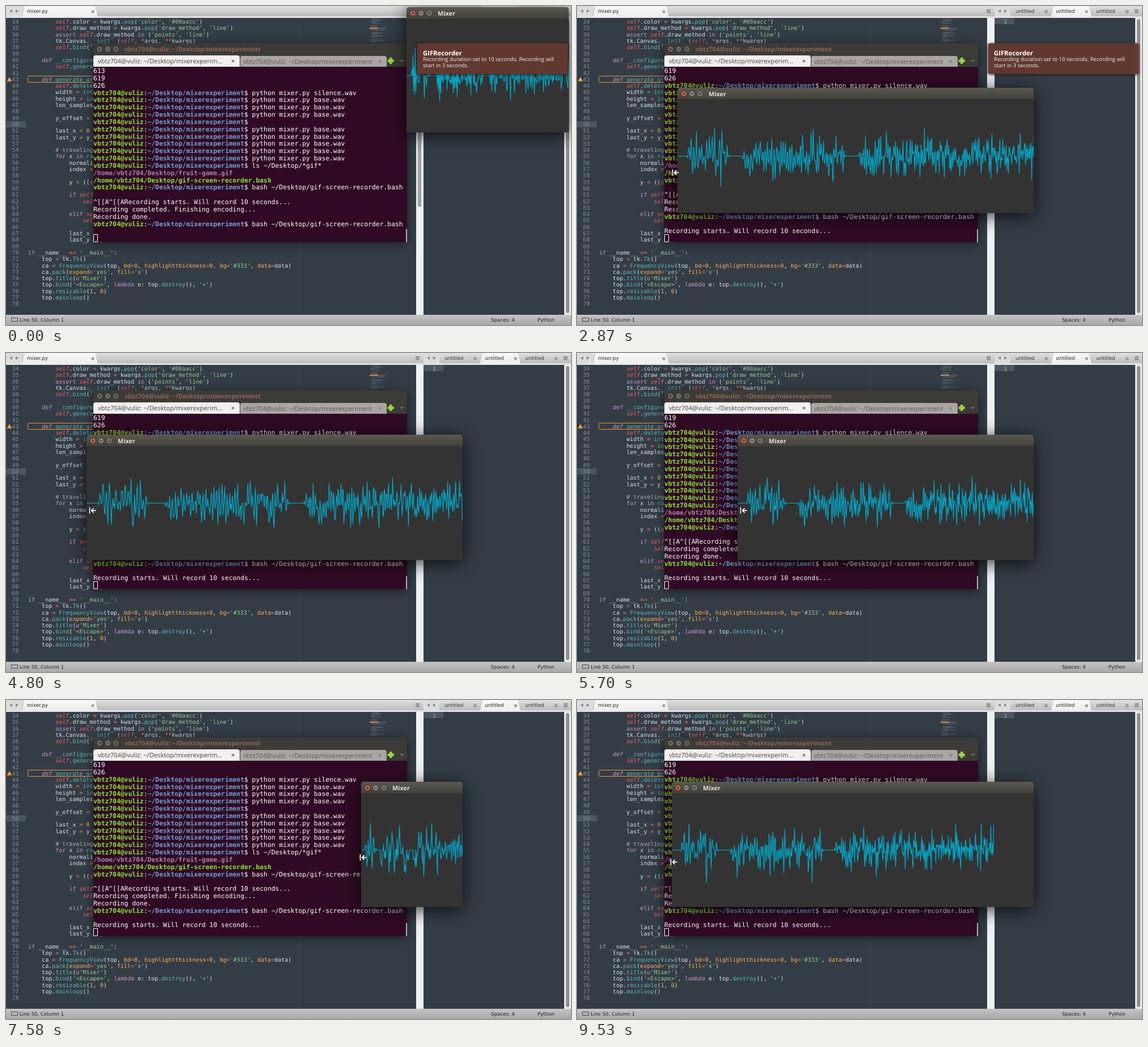
Write an HTML page with a canvas that moves like this. It is 996 px wide and 562 px high and loops after 9.61 s.

```html
<!DOCTYPE html>
<html lang="en">
<head>
<meta charset="utf-8">
<title>Mixer</title>
<style>
html, body { margin: 0; width: 100%; height: 100%; overflow: hidden; background: #343d46; }
canvas { display: block; width: 996px; height: 562px; }
</style>
</head>
<body>
<canvas id="stage" width="996" height="562"></canvas>
<script>
const ctx = document.getElementById('stage').getContext('2d');
ctx.textRendering = 'geometricPrecision';
ctx.lineJoin = 'bevel';

const LOOP = 9610, HOLD = 70;
const DROP = 560, RESIZE = 1260, FADE = 3330, PLOT_LAG = 200;
const MONO = '"DejaVu Sans Mono", monospace';
const SANS = '"DejaVu Sans", sans-serif';
const UI = '"Open Sans", sans-serif';
const USER = 'vbtz704', HOST = 'vuliz';
const PATH = '~/Desktop/mixerexperiment';

// ---- motion
const clamp = v => Math.max(0, Math.min(1, v));
const mix = (a, b, k) => a + (b - a) * k;
const ease = k => k * k * (3 - 2 * k);
const bell = (x, mid, w) => Math.exp(-(((x - mid) / w) ** 2));

// turning points of the dragged left edge: time, x
const EDGE = [
  [1940, 519], [2220, 303], [2660, 177], [2870, 177], [3140, 133], [3900, 48], [4600, 48],
  [4760, 142], [5260, 224], [5500, 225], [5670, 283], [6340, 406], [7350, 626], [7600, 626],
  [7940, 619], [8650, 340], [9070, 325], [9320, 238], [9520, 167]
];

function edgeAt(t) {
  const i = EDGE.findIndex(p => p[0] >= t);
  if (i === 0) return EDGE[0][1];
  if (i < 0) return EDGE[EDGE.length - 1][1];
  const [t0, x0] = EDGE[i - 1], [t1, x1] = EDGE[i];
  return Math.round(mix(x0, x1, (t - t0) / (t1 - t0)));
}

function resizerY(t) {
  return Math.round(mix(257, 277, clamp((t - 1800) / 500)) + 16 * bell(t, 2870, 500)
    + 8 * clamp((t - 7600) / 1900));
}

// ---- drawing helpers
function rect(x, y, w, h, fill) { ctx.fillStyle = fill; ctx.fillRect(x, y, w, h); }

function vgrad(y, h, a, b) {
  const g = ctx.createLinearGradient(0, y, 0, y + h);
  g.addColorStop(0, a); g.addColorStop(1, b);
  return g;
}

function round(x, y, w, h, r, fill) {
  ctx.beginPath(); ctx.roundRect(x, y, w, h, r);
  ctx.fillStyle = fill; ctx.fill();
}

function disc(x, y, r, fill, line) {
  ctx.beginPath(); ctx.arc(x, y, r, 0, 7);
  ctx.fillStyle = fill; ctx.fill();
  ctx.strokeStyle = line; ctx.lineWidth = 1; ctx.stroke();
}

function poly(pts, fill) {
  ctx.beginPath();
  pts.forEach(p => ctx.lineTo(...p));
  ctx.closePath(); ctx.fillStyle = fill; ctx.fill();
}

function lines(paths, color, width) {
  ctx.beginPath();
  for (const p of paths) p.forEach((q, i) => i ? ctx.lineTo(...q) : ctx.moveTo(...q));
  ctx.strokeStyle = color; ctx.lineWidth = width; ctx.stroke();
}

// y is the middle of the capitals; returns the end x
function text(s, x, y, color, size, family, style = '') {
  ctx.font = `${style} ${size}px ${family}`;
  ctx.fillStyle = color;
  ctx.fillText(s, x, y + size * 0.36);
  return x + ctx.measureText(s).width;
}

function cross(x, y, r, color) {
  lines([[[x - r, y - r], [x + r, y + r]], [[x - r, y + r], [x + r, y - r]]], color, 1.2);
}

function shadowed(blur, dy, alpha, draw) {
  ctx.save();
  ctx.shadowColor = `rgba(0,0,0,${alpha})`;
  ctx.shadowBlur = blur; ctx.shadowOffsetY = dy;
  draw();
  ctx.restore();
}

function rnd(n) {
  const s = Math.sin(n * 127.1 + 11.7) * 43758.5453;
  return s - Math.floor(s);
}

// ---- editor
const CODE = `        self.color = kwargs.pop('color', '#00aacc')
        self.draw_method = kwargs.pop('draw_method', 'line')
        assert self.draw_method in ('points', 'line')
        tk.Canvas.__init__(self, *args, **kwargs)
        self.bind('<Configure>', self.__configure)

    def __configure(self, event):
        self.generate_graph()

    def generate_graph(self):
        self.delete('all')
        width = int(self.winfo_width())
        height = int(self.winfo_height())
        len_samples = len(self.data)

        y_offset = height / 2

        last_x = 0
        last_y = y_offset

        # traveling the samples
        for x in range(width):
            normalized = x / float(width)
            index = int(normalized * len_samples)

            y = ((self.data[index] * height) + y_offset)

            if self.draw_method == 'points':
                self.create_line(x, y, x + 1, y)

            elif self.draw_method == 'line':
                self.create_line(last_x, last_y, x, y)

            last_x = x
            last_y = y

if __name__ == '__main__':
    top = tk.Tk()
    ca = FrequencyView(top, bd=0, highlightthickness=0, bg='#333', data=data)
    ca.pack(expand='yes', fill='x')
    top.title(u'Mixer')
    top.bind('<Escape>', lambda e: top.destroy(), '+')
    top.resizable(1, 0)
    top.mainloop()
`.split('\n');

const TOKEN = /(#.*)|('[^']*')|\b(self)\b|\b(def|lambda|u(?='))\b|\b(assert|in|if|elif|for)\b|(\b\d+\b)|(\w+)(?=\()|(\w+)(?==)|([=+\-*\/]+)|\w+|\s+|./g;
const TOKEN_COLORS = ['#a6acb9', '#99c794', '#ec5f66', '#c695c6', '#c695c6', '#f9ae58', '#5fb4b4', '#f9ae58', '#f97b58'];
const EDIT_Y = 27.5, EDIT_PITCH = 11.3, EDIT_SIZE = 10.03;

function codeLine(src, y) {
  let x = 39;
  for (const m of src.matchAll(TOKEN)) {
    const kind = m.slice(1).findIndex(g => g !== undefined);
    const slant = kind === 2 || kind === 3 ? 'italic' : '';
    x = text(m[0], x, y, TOKEN_COLORS[kind] || '#d8dee9', EDIT_SIZE, MONO, slant);
  }
}

function tab(x, w, label, active, closable) {
  if (active) {
    poly([[x, 20], [x + 5, 0], [x + w - 5, 0], [x + w, 20]], vgrad(0, 20, '#f8f8f8', '#ececec'));
  }
  text(label, x + 9, 9, active ? '#222' : '#333', 8.6, SANS);
  if (closable) cross(x + w - 9, 10, 2.2, '#666');
  else disc(x + w - 9, 10, 2.4, '#aaa', '#888');
}

function navArrows(x) {
  rect(x - 6, 0, 28, 18, '#dcdcdc');
  poly([[x, 9], [x + 5, 6], [x + 5, 12]], '#888');
  poly([[x + 16, 9], [x + 11, 6], [x + 11, 12]], '#888');
}

function menuIcon(x) {
  for (let i = 0; i < 3; i++) rect(x, 6 + i * 2.5, 7, 1.2, '#666');
}

function tabBar() {
  rect(0, 0, 996, 21, vgrad(0, 18, '#e0e0e0', '#bcbcbc'));
  rect(0, 18, 996, 3, '#e2e2e2');
  navArrows(6); navArrows(742);
  tab(28, 134, 'mixer.py', true, true);
  for (let i = 0; i < 3; i++) tab(764 + i * 71.3, 72, 'untitled', i === 1, i === 1);
  menuIcon(722); menuIcon(983);
}

function statusBar() {
  rect(0, 544, 996, 18, vgrad(544, 18, '#c4c4c4', '#a8a8a8'));
  ctx.strokeStyle = '#444'; ctx.lineWidth = 1;
  ctx.strokeRect(9.5, 549.5, 11, 6);
  text('Line 50, Column 1', 24, 552.5, '#222', 8.6, SANS);
  text('Spaces: 4', 855, 552.5, '#222', 8.6, SANS);
  text('Python', 937, 552.5, '#222', 8.6, SANS);
}

function minimap() {
  for (let i = 0; i < 21; i++) {
    if (i % 6 === 5) continue;
    const indent = Math.floor(rnd(i) * 3) * 2;
    rect(641 + indent, 22 + i * 2, 6 + rnd(i + 40) * 23, 1, 'rgba(170,185,195,.32)');
  }
  rect(641, 38, 15, 2, '#c98a40');
}

function editor() {
  rect(0, 0, 996, 562, '#343d46');
  rect(0, 203, 35, 11, '#4c565f');
  rect(517, 21, 1, 523, '#414a53');
  CODE.forEach((src, i) => {
    const y = EDIT_Y + i * EDIT_PITCH;
    text(String(34 + i), 10.5, y, '#848b95', EDIT_SIZE, MONO);
    codeLine(src, y);
  });
  ctx.strokeStyle = '#e8973a'; ctx.lineWidth = 1;
  ctx.beginPath(); ctx.roundRect(38.5, 123.5, 150, 11, 2); ctx.stroke();
  poly([[6, 125], [10.5, 133], [1.5, 133]], '#f08a2c');
  rect(5.5, 128, 1, 3, '#fff');
  minimap();

  rect(723, 21, 13, 523, '#f0f0f0');
  round(726, 160, 6, 194, 3, '#a2a2a2');
  rect(984, 21, 12, 523, '#eee');
  round(987, 23, 6, 518, 3, '#8f8f8f');
  rect(736, 21, 35, 11, '#4c565f');
  text('1', 752, 27.5, '#a0a7b0', EDIT_SIZE, MONO);
  tabBar();
  statusBar();
}

// ---- terminal; lines starting with $ get the prompt
const RUN = '$python mixer.py ', GIF = 'gif-screen-recorder.bash';
const LOG = [
  '613', '619', '626', RUN + 'silence.wav',
  ...Array(3).fill(RUN + 'base.wav'), '$', ...Array(5).fill(RUN + 'base.wav'),
  '$ls ~/Desktop/*gif*',
  `/home/${USER}/Desktop/fruit-game.gif`, `/home/${USER}/Desktop/${GIF}`,
  '$bash ~/Desktop/' + GIF, '',
  '^[[A^[[ARecording starts. Will record 10 seconds...',
  'Recording completed. Finishing encoding...', 'Recording done.',
  '$bash ~/Desktop/' + GIF, '',
  'Recording starts. Will record 10 seconds...'
];

function buttons(x, y, closeFill, fill) {
  [closeFill, fill, fill].forEach((c, i) => disc(x + i * 14.4, y, 5.2, c, '#302f2b'));
  cross(x, y, 1.8, '#3a3833');
  rect(x + 12.4, y - 0.5, 4, 1.2, '#3a3833');
  ctx.strokeRect(x + 27, y - 1.6, 3.6, 3.2);
}

function logLine(s, y) {
  const put = (str, x, color, style) => text(str, x, y, color, 11.33, MONO, style);
  if (s[0] === '$') {
    let x = put(`${USER}@${HOST}`, 154, '#8ae234', 'bold');
    x = put(':', x, '#fff', '');
    x = put(PATH, x, '#729fcf', 'bold');
    put('$ ' + s.slice(1), x, '#fff', '');
  } else if (s[0] === '/') {
    put(s, 154, s.endsWith('.gif') ? '#ad7fa8' : '#8ae234', 'bold');
  } else put(s, 154, '#fff', '');
}

function terminal(scrolled) {
  shadowed(18, 3, 0.55, () => round(154, 66, 553, 350, [5, 5, 0, 0], '#3c3b37'));
  buttons(165, 76, '#6e6c65', '#6e6c65');
  const where = `${USER}@${HOST}: ${PATH}`;
  text(where, 209, 76, '#8d6358', 11, UI, 'bold');
  round(154, 87, 258, 20, [4, 4, 0, 0], '#f3efef');
  round(413, 88, 258, 19, [4, 4, 0, 0], '#aaa5a2');
  text(where.slice(0, -3) + '…', 162, 97, '#4a4546', 11.2, UI);
  text(where, 418, 97.5, '#5f5a58', 11.2, UI);
  cross(400, 97, 2.2, '#555');
  cross(659, 97.5, 2.2, '#777');
  rect(676, 91, 4.5, 11, '#9bd93c');
  rect(672.8, 94.3, 11, 4.5, '#9bd93c');
  poly([[694, 95], [702, 95], [698, 99]], '#6c6a65');
  rect(154, 107, 553, 309, '#300a24');
  const first = scrolled ? 1 : 0;
  LOG.slice(first, first + 23).forEach((s, i) => logLine(s, 114 + i * 12.83));
  ctx.strokeStyle = '#fff'; ctx.lineWidth = 1;
  ctx.strokeRect(154.5, 402.5, 7, 13);
  rect(705, 393, 2, 23, '#b8b3ae');
}

// ---- mixer window
const SILENCES = [[-1, 0.026], [0.1465, 0.181], [0.473, 0.504]];

function envelope(t) {
  const gate = SILENCES.reduce((e, [a, b]) => e * clamp(Math.max(a - t, t - b) / 0.012), 1);
  return gate * (1 + 0.45 * bell(t, 0.116, 0.012) + 0.45 * bell(t, 0.45, 0.015));
}

const knot = k => (k % 2 ? 1 : -1) * (4 + 40 * rnd(k) ** 1.3);

// the tone rises towards the end of the clip
function sample(x, w) {
  const t = x / w, p = 260 * t * (1 + 0.4 * t), k = Math.floor(p);
  return envelope(t) * (mix(knot(k), knot(k + 1), p - k) + (rnd(x + w * 3) - 0.5) * 24);
}

function mixer(x, y, w, plotW) {
  shadowed(32, 5, 0.8, () => round(x, y, w, 220.5, [5, 5, 0, 0], '#3c3b37'));
  round(x, y, w, 22, [5, 5, 0, 0], vgrad(y, 20, '#5b594f', '#42413b'));
  buttons(x + 11.3, y + 10.5, '#c65f4c', '#85837a');
  text('Mixer', x + 55, y + 10.8, '#e2dfd6', 10.8, UI, 'bold');
  rect(x, y + 20, w, 200.5, '#333');
  ctx.save();
  ctx.beginPath(); ctx.rect(x, y + 20, w, 200.5); ctx.clip();
  const pts = Array.from({ length: plotW + 1 },
    (_, i) => [x + i + 0.5, y + 120.5 + sample(i, plotW)]);
  lines([pts], '#00aacc', 1.2);
  ctx.restore();
}

function notice(alpha) {
  ctx.save();
  ctx.globalAlpha = alpha;
  shadowed(5, 1, 0.7, () => round(724.5, 65.5, 266, 54.5, 4, 'rgba(102,58,49,.95)'));
  text('GIFRecorder', 735, 82.5, '#fff', 11.3, UI, 'bold');
  text('Recording duration set to 10 seconds. Recording will', 735, 94, '#eee', 9.53, UI);
  text('start in 3 seconds.', 735, 104.5, '#eee', 9.53, UI);
  ctx.restore();
}

// ---- pointers
function arrow(x, y) {
  const p = [[0, 0], [0, 14], [3.3, 11], [5.6, 16], [7.8, 15], [5.6, 10.2], [10, 10]]
    .map(([a, b]) => [x + a, y + b]);
  poly(p, '#fff');
  lines([[...p, p[0]]], '#111', 1);
}

function resizer(x, y) {
  const paths = [
    [[x, y - 5.5], [x, y + 5.5]], [[x + 3, y], [x + 11, y]],
    [[x + 7, y - 4], [x + 3, y], [x + 7, y + 4]]
  ];
  lines(paths, '#111', 3.6);
  lines(paths, '#fff', 1.8);
}

function draw(t) {
  editor();
  terminal(t > 0);
  const drag = ease(clamp(t / DROP));
  const resizing = t >= RESIZE;
  const x = resizing ? edgeAt(t) : Math.round(mix(706, 519, drag));
  const y = Math.round(mix(2, 144, drag));
  mixer(x, y, resizing ? 805 - x : 286, resizing ? 805 - edgeAt(t - PLOT_LAG) : 286);
  if (t < FADE + 230) notice(t < FADE ? 1 : 0.45);
  if (resizing) resizer(edgeAt(t + 40) - 1.5, resizerY(t) + 0.5);
  else if (t > 0) {
    const k = ease(clamp((t - 660) / 460));
    arrow(mix(x + 118, 525, k), mix(y + 7, 257, k));
  }
}

let shown = -1;
function tick(now) {
  const t = Math.floor(now % LOOP / HOLD) * HOLD;
  if (t !== shown) draw(shown = t);
  requestAnimationFrame(tick);
}
tick(performance.now());
</script>
</body>
</html>
```
